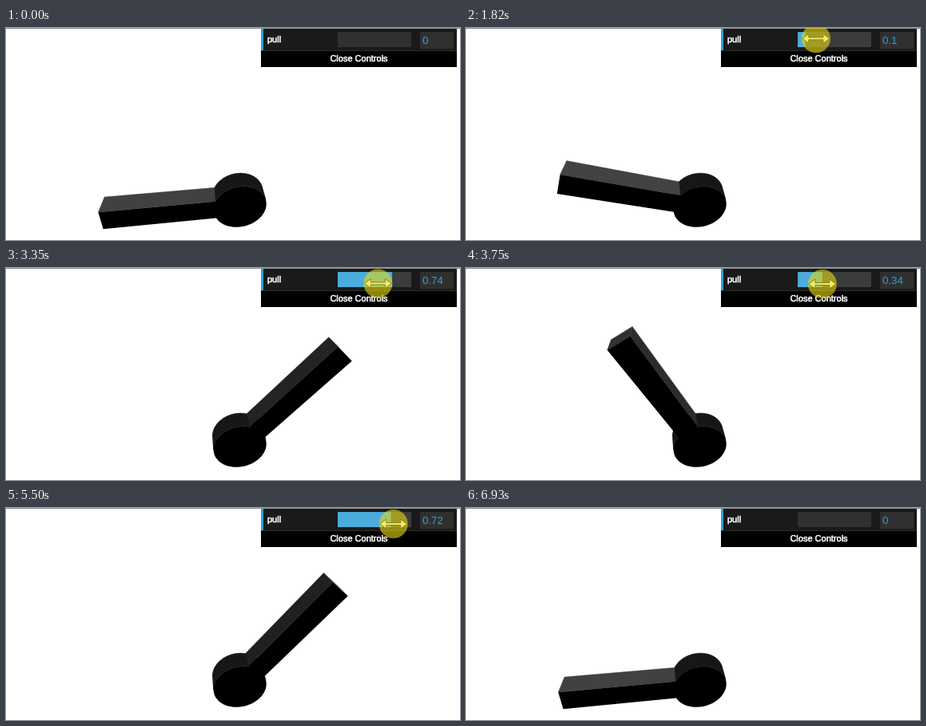
Animation, 568 px wide and 266 px high, one loop 7330 ms. Source, as an HTML page with a canvas:

```html
<!DOCTYPE html>
<html lang="en">
<head>
<meta charset="utf-8">
<title>Lever</title>
<style>
  html, body { margin: 0; width: 100%; height: 100%; overflow: hidden; background: #fff; }
  canvas { display: block; }
</style>
</head>
<body>
<canvas id="stage" width="568" height="266"></canvas>
<script>
const ctx = document.getElementById('stage').getContext('2d');
const FONT = '"Liberation Sans", Arial, sans-serif';
const LOOP = 7330, STEP = 80, OFFSET = 60;
const PRESS = 1500, RELEASE = 6300;
const LAG = 130; // the slider trails the pointer by this many ms
const SLIDER = { x: 415, y: 5, w: 92, h: 19 };
const CLOSE = { x: 319, y: 29, w: 245, h: 20 };

// Eases between [time, value] turning points
function track(...points) {
  return time => {
    let last = points[0];
    for (const next of points) {
      if (time < next[0]) {
        const k = Math.max(0, (time - last[0]) / (next[0] - last[0]));
        return last[1] + (next[1] - last[1]) * (1 - Math.cos(Math.PI * k)) / 2;
      }
      last = next;
    }
    return last[1];
  };
}

// Drag position along the slider; it may run past either end
const drag = track(
  [1520, .03], [2540, 1.13], [2810, 1.13], [3620, .335], [3900, .335],
  [4240, .7], [4880, .33], [5480, .758], [5500, .758], [6140, -.41]
);
const enterX = track([220, 505], [1020, 428], [1100, 428], [1340, 418]);
const exitX = track([6500, 376], [6860, 522]);
const pointerY = track(
  [220, 267], [1020, 32], [1100, 32], [1340, 13], [PRESS, 13],
  [3740, 20], [5500, 20], [6140, 19], [6500, 19], [6860, 300]
);

function stateAt(time) {
  const now = Math.floor((time - OFFSET) / STEP) * STEP + OFFSET;
  const pressed = now >= PRESS && now < RELEASE;
  const value = now < PRESS ? 0 : Math.min(1, Math.max(0, drag(now - LAG)));
  let x = now < PRESS ? enterX(now) : exitX(now);
  if (pressed) x = SLIDER.x + SLIDER.w * drag(now);
  return { value, x, y: pointerY(now), pressed };
}

// Perspective view; x and y lie in the front plane, z runs backwards
function project([x, y], z) {
  const d = 1 + .054 * x - .2226 * y + .061 * z;
  return [
    293 + (165 * x + 2.4 * y - 52 * .061 * z) / d,
    225.4 + (-15.7 * x - 126.5 * y - 305 * .061 * z) / d
  ];
}

function polygon(points, path = new Path2D()) {
  points.forEach(([x, y], i) => i ? path.lineTo(x, y) : path.moveTo(x, y));
  path.closePath();
  return path;
}

// Outline runs counterclockwise; shade(i) gives the grey of side i
function prism(outline, shade) {
  const front = outline.map(p => project(p, 0));
  const back = outline.map(p => project(p, 1));
  const sides = new Map(); // one path per grey keeps curved sides seamless
  front.forEach((a, i) => {
    const j = (i + 1) % front.length;
    const b = front[j], c = back[i];
    const facing = (b[0] - a[0]) * (c[1] - a[1]) - (b[1] - a[1]) * (c[0] - a[0]);
    if (facing <= 0) return;
    const grey = Math.max(0, Math.round(shade(i)));
    sides.set(grey, polygon([a, b, back[j], c], sides.get(grey)));
  });
  ctx.lineWidth = .4;
  for (const [grey, path] of sides) {
    ctx.fillStyle = ctx.strokeStyle = `rgb(${grey},${grey},${grey})`;
    ctx.fill(path);
    ctx.stroke(path);
  }
  ctx.fillStyle = '#000';
  ctx.fill(polygon(front));
}

function drawLever(value) {
  const radius = .2, half = .081, near = .184;
  const disc = Array.from({ length: 72 }, (_, i) => {
    const a = i * Math.PI / 36;
    return [radius * Math.cos(a), radius * Math.sin(a)];
  });
  prism(disc, () => 24);

  const angle = Math.PI * (1 - value);
  const cos = Math.cos(angle), sin = Math.sin(angle);
  const arm = [[near, -half], [1, -half], [1, half], [near, half]]
    .map(([d, s]) => [d * cos - s * sin, d * sin + s * cos]);
  prism(arm, i => {
    if (i === 3) return 0;
    const normal = angle + (i - 1) * Math.PI / 2;
    return 13.3 * Math.cos(normal) + 65 * Math.sin(normal);
  });
}

function box(color, x, y, w, h) {
  ctx.fillStyle = color;
  ctx.fillRect(x, y, w, h);
}

function label(text, x, y, size, color, weight, align = 'left') {
  ctx.font = `${size}px ${FONT}`;
  ctx.textAlign = align;
  ctx.fillStyle = ctx.strokeStyle = color;
  ctx.lineWidth = weight;
  ctx.fillText(text, x, y);
  if (weight) ctx.strokeText(text, x, y);
}

const over = (s, r) => s.x >= r.x && s.x < r.x + r.w && s.y >= r.y && s.y < r.y + r.h;

function drawPanel(s) {
  const hot = over(s, SLIDER);
  const { x, y, w, h } = SLIDER;
  box('#8a8a8a', 0, 0, 568, 1);
  box('#1a1a1a', 319, 1, 245, 27);
  box('#2fa1d6', 319, 1, 3, 27);
  box('#2c2c2c', 319, 28, 245, 1);
  box(!s.pressed && over(s, CLOSE) ? '#111' : '#000', CLOSE.x, CLOSE.y, CLOSE.w, CLOSE.h);
  box(hot ? '#3c3c3c' : '#303030', x, y, w, h);
  box(hot ? '#4aabdc' : '#3a9fd8', x, y, w * s.value, h);
  box('#303030', 518, 5, 42, 21);
  label(String(Math.round(s.value * 100) / 100), 521, 20, 13.33, '#2fa1d6', 0);
  label('pull', 327, 18, 11, '#fff', .55);
  label('Close Controls', 441.5, 42, 11, '#fff', .55, 'center');
}

const arrow = [[0, 0], [0, 30], [7, 24], [12, 36], [17, 34], [12, 22], [21, 22]];
const halfResize = [[-9, 1.5], [-9, 6], [-17, 0], [-9, -6], [-9, -1.5]];
const resize = [...halfResize, ...halfResize.map(([x, y]) => [-x, -y])];
const hand = [[-3, 0], [3, 0], [3, 11], [16, 15], [13, 30], [-2, 30], [-9, 15], [-3, 18]];

function drawPointer(s) {
  let shape = arrow;
  if (s.pressed || over(s, SLIDER)) shape = resize;
  else if (over(s, CLOSE)) shape = hand;
  const path = polygon(shape.map(([x, y]) => [x + s.x, y + s.y]));
  ctx.fillStyle = '#fff';
  ctx.strokeStyle = '#000';
  ctx.lineWidth = 1;
  ctx.fill(path);
  ctx.stroke(path);
  if (s.pressed) {
    ctx.fillStyle = 'rgba(232,218,18,.6)';
    ctx.beginPath();
    ctx.arc(s.x, s.y, 18, 0, Math.PI * 2);
    ctx.fill();
  }
}

const origin = performance.now();
function draw() {
  const s = stateAt((performance.now() - origin) % LOOP);
  box('#fff', 0, 0, 568, 266);
  drawLever(s.value);
  drawPanel(s);
  drawPointer(s);
  requestAnimationFrame(draw);
}
draw();
</script>
</body>
</html>
```
